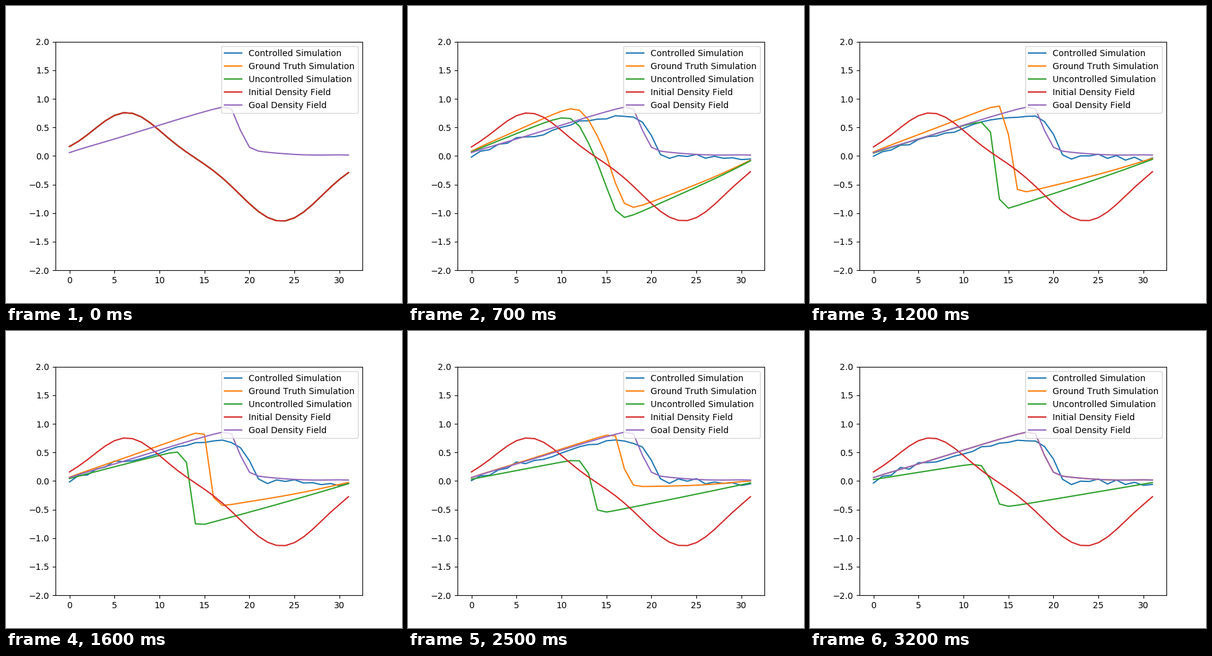
Write a matplotlib script that moves like this. It is 640 by 480 pixels and loops after 3300 ms.

```python
import numpy as np
import matplotlib.pyplot as plt
from matplotlib.animation import FuncAnimation

plt.rcParams["text.kerning_factor"] = 6  # classic text spacing

CELLS, STEPS = 32, 33
DT = 0.03 * CELLS               # advection distance in cells per unit speed
NU = 0.003 * 0.03 * CELLS ** 2  # viscosity per step in cell units
x = np.arange(CELLS)


def bump(center, height, spread):
    return height * np.exp(-(x - center) ** 2 / spread)


def diffuse(u):
    p = np.pad(u, 1)
    return u + NU * (p[2:] - 2 * u + p[:-2])


def step(u, force):
    """Viscous Burgers step: push, diffuse, trace back. Zero outside."""
    v = diffuse(u + force)
    return np.interp(x - DT * v, np.arange(-1, CELLS + 1), np.pad(v, 1))


def simulate(u, force=0):
    states = [u]
    for _ in range(STEPS - 1):
        states.append(step(states[-1], force))
    return np.array(states)


start = bump(6.35, 0.76, 26.4) + bump(23.55, -1.14, 40.6)
free = simulate(start)
truth = simulate(start, bump(15.1, 0.0325, 117))

# the controller reaches a rounded ramp quickly, then jitters around it
ramp = [(0, 0.015), (5, 0.3), (8, 0.38), (12, 0.6), (16.5, 0.72), (18, 0.68),
        (19, 0.595), (20, 0.365), (21, 0.03), (22, -0.03), (24.5, 0.03),
        (26, -0.025), (31, -0.065)]
ripple = np.where(abs(x - 13.5) > 8, 0.02, 0) * (-1.0) ** (x + 1)
held = np.interp(x, *zip(*ramp)) + ripple
jitter = np.random.default_rng(4).normal(0, 0.012, (STEPS, CELLS))
lag = 0.5 ** np.arange(STEPS)[:, None]
controlled = lag * free + (1 - lag) * (held + jitter)

series = {
    "Controlled Simulation": controlled,
    "Ground Truth Simulation": truth,
    "Uncontrolled Simulation": free,
    "Initial Density Field": [start] + [diffuse(start)] * (STEPS - 1),
    "Goal Density Field": [truth[-1]] * STEPS,
}

fig, ax = plt.subplots(figsize=(6.4, 4.8), dpi=100)
lines = [ax.plot(x, data[0], label=name)[0] for name, data in series.items()]
ax.set_ylim(-2, 2)
ax.legend(loc="upper right")


def draw(t):
    for line, data in zip(lines, series.values()):
        line.set_ydata(data[t])
    return lines


anim = FuncAnimation(fig, draw, frames=STEPS, interval=100, repeat=True,
                     repeat_delay=0)
plt.show()
```
